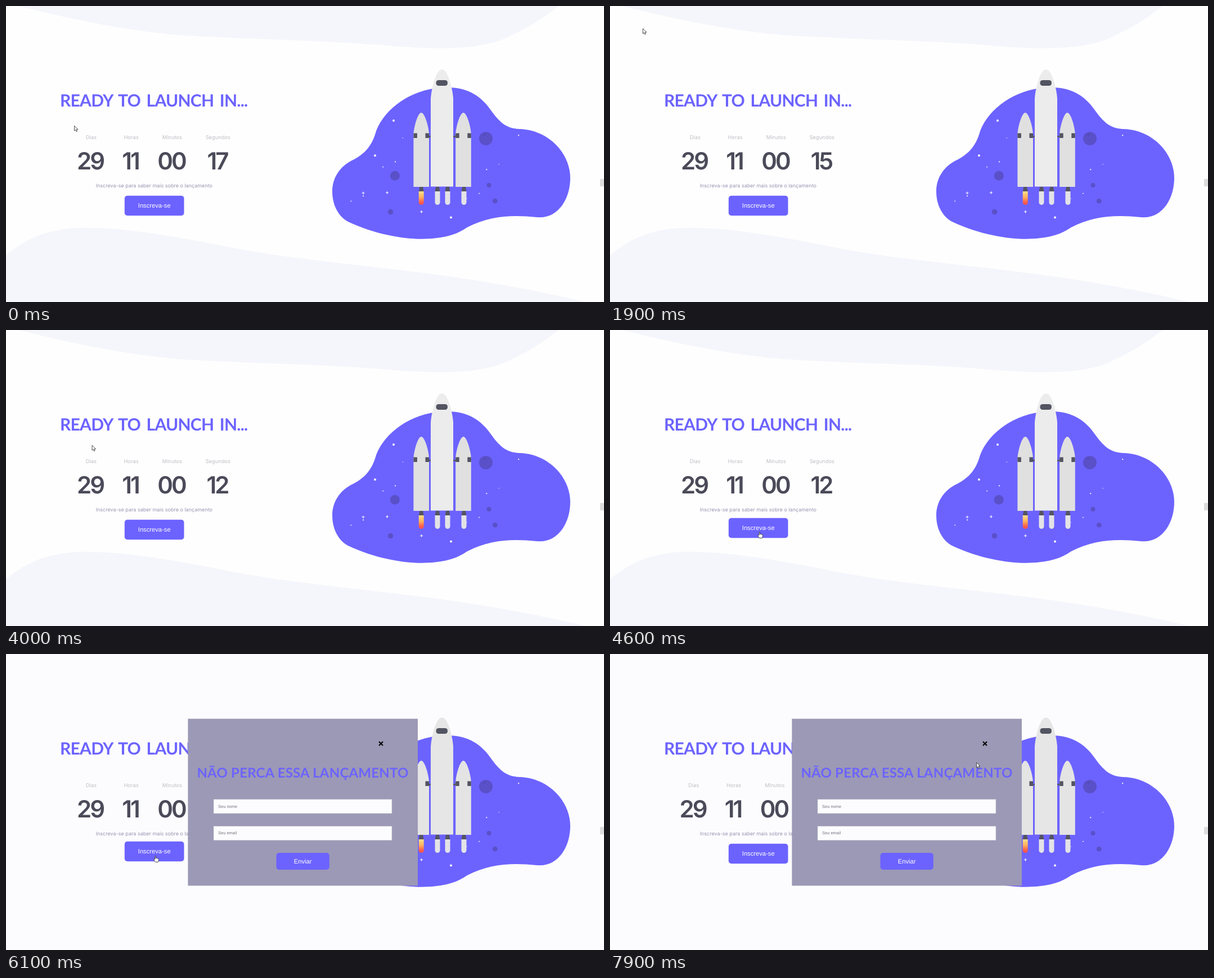
These frames come from a looping animation (1063x527 px, 8 s). An HTML page:

```html
<!DOCTYPE html>
<html lang="pt">
<head>
<meta charset="utf-8">
<title>Countdown</title>
<style>
  html, body { margin: 0; width: 100%; height: 100%; overflow: hidden; background: #fefefe; }
  svg { display: block; width: 1063px; height: 527px; }
  text { font-family: Inter, sans-serif; text-rendering: geometricPrecision; }
  .mid { text-anchor: middle; }
  .title { font-family: Lato, sans-serif; font-weight: 700; fill: #6c63ff; }
  .label { font-size: 9.3px; fill: #bfbfc6; }
  .digits { font-size: 42px; font-weight: 600; letter-spacing: -3px; fill: #4b4a59; }
  .ui { font: 11.2px "Liberation Sans", Arial, sans-serif; fill: #fff; }
  .hint { font: 7.5px "Liberation Sans", Arial, sans-serif; fill: #757580; }
  .dark { fill: #535461; }
</style>
</head>
<body>
<svg viewBox="0 0 1063 527">
  <defs>
    <linearGradient id="fire" x2="0" y2="1">
      <stop offset="0" stop-color="#fbe08c"/>
      <stop offset=".45" stop-color="#fdb05a"/>
      <stop offset=".8" stop-color="#fb5f4c"/>
      <stop offset="1" stop-color="#fa5050"/>
    </linearGradient>
    <g id="booster">
      <path d="M-13.8 322V228C-13 214-6 190 0 190S13 214 13.8 228V322Z"/>
      <path class="dark" d="M-13.8 226.5h6.5v8.5h-6.5ZM7.3 226.5h6.5v8.5h-6.5Z"/>
    </g>
    <path id="blob" d="M580 330C580 303 597 283 617 274C640 262 650 247 656 229C668 185 722 144 785 145C823 145 846 162 863 187C880 211 893 218 912 219C965 220 1003 263 1003 306C1003 344 981 380 943 376C903 372 862 372 820 394C812 399 807 402 800 405C765 418 720 417 680 408C655 403 632 395 607 383.5C591 374 580 355 580 330Z"/>
    <clipPath id="sky"><use href="#blob"/></clipPath>
  </defs>

  <rect id="page" width="1063" height="527"/>
  <g id="waves" fill="#f5f6fb">
    <path d="M22 0C100 20 210 44 310 52C440 60 560 61 660 69C760 78 830 79 882 60C915 45 945 30 982 0Z"/>
    <path d="M0 444C40 410 80 397 130 395C200 393 300 409 400 430C500 449 600 458 700 470C820 484 940 505 1030 527H0Z"/>
  </g>
  <rect x="1056" y="308" width="7" height="13" fill="#dcdcdc"/>

  <use href="#blob" fill="#6c63ff"/>
  <g fill="#5a50c8">
    <circle cx="853" cy="236" r="12"/>
    <circle cx="691.3" cy="302.3" r="8.5"/>
    <circle cx="683.5" cy="366.5" r="4.8"/>
    <circle cx="858.5" cy="319" r="4"/>
    <circle cx="869.3" cy="347.2" r="4.4"/>
  </g>
  <path d="M848 231q2-3 5-2" fill="none" stroke="#4d449f"/>
  <g id="stars" fill="#fff" clip-path="url(#sky)"></g>
  <path d="M689 204h0M656 266.3h0M791 376.5h0" stroke="#fff" stroke-width="4" stroke-linecap="round"/>
  <path d="M632.5 333h5M635 330.5v5M675 332.3h5M677.5 329.8v5M736 366.3h5M738.5 363.8v5" stroke="#fff"/>

  <path class="dark" d="M750 231h6v2.5h-6ZM794 231h6v2.5h-6Z"/>
  <g id="boosters">
    <use href="#booster" x="738.2"/>
    <use href="#booster" x="813"/>
  </g>
  <path id="hull" d="M755 321.5V165C756 148 764 113 775 113S794 148 795 165V321.5Z"/>
  <rect class="dark" x="764.5" y="132" width="20.5" height="10" rx="4.5"/>
  <g id="engines"></g>

  <text class="title" x="96" y="178.5" font-size="30" letter-spacing="-.75" word-spacing="4">READY TO LAUNCH IN...</text>
  <g id="counter">
    <text class="label mid" x="151.3" y="237">Dias</text>
    <text class="label mid" x="222.5" y="237">Horas</text>
    <text class="label mid" x="295.3" y="237">Minutos</text>
    <text class="label mid" x="376.8" y="237">Segundos</text>
    <text class="digits mid" x="149.5" y="291.3">29</text>
    <text class="digits mid" x="221" y="291.3">11</text>
    <text class="digits mid" x="294" y="291.3">00</text>
    <text class="digits mid" x="375.5" y="291.3" id="seconds">17</text>
  </g>
  <text class="mid" x="263.3" y="323.2" font-size="9" fill="#9795b2">Inscreva-se para saber mais sobre o lançamento</text>
  <g id="button">
    <rect x="210.8" y="337.8" width="105.7" height="35.4" rx="5" fill="#6c63ff"/>
    <text class="ui mid" x="263.7" y="359.2">Inscreva-se</text>
  </g>

  <g id="modal">
    <rect x="323.4" y="115.3" width="408.6" height="297.2" fill="#9c99b6"/>
    <path d="M663 156l7 7m0-7l-7 7" stroke="#000" stroke-width="2"/>
    <text class="title mid" x="527.5" y="220" font-size="24" letter-spacing=".2">NÃO PERCA ESSA LANÇAMENTO</text>
    <path d="M369 258.7h317v25.2h-317ZM369 306.5h317v25.2h-317Z" fill="#fcfcfe" stroke="#b4b2c6" stroke-width=".6"/>
    <text class="hint" x="377" y="273.6">Seu nome</text>
    <text class="hint" x="377" y="321.4">Seu email</text>
    <rect x="480.5" y="354" width="94.3" height="30" rx="5" fill="#6c63ff"/>
    <text class="ui mid" x="527.7" y="372.8">Enviar</text>
  </g>

  <g id="cursor" fill="#fff" stroke="#222" stroke-width=".8" stroke-linejoin="round">
    <path id="arrow" d="M.5 .2V9.2L2.6 7.4L4 10.6L5.6 9.9L4.2 6.8H7Z"/>
    <path id="hand" d="M3 7V1.3Q3.8 .2 4.6 1.3V5Q5.6 4.3 6.2 5.3Q7.2 4.6 7.8 5.7Q9.2 5.2 9.4 6.6V9L8.3 12H3.8L.5 7.6Q.6 6.2 1.8 6.6Z"/>
  </g>
</svg>
<script>
const el = id => document.getElementById(id);
const show = (id, on) => el(id).style.display = on ? "" : "none";

// Faint stars, spread evenly by irrational steps
el("stars").innerHTML = Array.from({ length: 16 }, (_, i) =>
  `<circle cx="${600 + i * .618 % 1 * 390}" cy="${160 + i * .755 % 1 * 230}" r="${.7 + i % 3 * .2}"/>`).join("");
el("engines").innerHTML = [738.2, 767, 785, 814].map((x, i) => `
  <path class="dark" d="M${x - 3} 322h6l1.3 8h-8.6Z"/>
  <path d="M${x - 4.5} 330h9v19.5a4.5 4.5 0 0 1-9 0Z" fill="${i ? "#e3e3e6" : "url(#fire)"}"/>`).join("");

const LOOP = 8000, STEP = 100;
const glides = [
  { start: 100, time: 500, to: [58, 40] },
  { start: 2000, time: 700, to: [104, 132] },
  { start: 3000, time: 600, to: [119, 158] },
  { start: 3950, time: 400, to: [262, 358.5] },
  { start: 6600, time: 400, to: [499, 396] },
  { start: 7100, time: 500, to: [580, 370] },
  { start: 7600, time: 300, to: [651, 193] }
];

const easeOut = (t, start, time, power = 2) =>
  1 - (1 - Math.min(1, Math.max(0, (t - start) / time))) ** power;

const pointerAt = t => glides.reduce((at, { start, time, to }) => {
  const k = easeOut(t, start, time);
  return at.map((v, i) => v + (to[i] - v) * k);
}, [121, 213]);

function draw() {
  const t = Math.floor(performance.now() % LOOP / STEP) * STEP;
  const open = t >= 6100;
  const seconds = 17 - Math.floor((t - 101) / 959 + 1);

  el("seconds").textContent = String(seconds).padStart(2, "0");
  el("counter").setAttribute("transform", `translate(${seconds > 9 ? 0 : -2.5} 0)`);
  const lift = 4 * (easeOut(t, 4350, 600, 2.6) - easeOut(t, 6900, 600, 2.6));
  el("button").setAttribute("transform", `translate(0 ${-lift})`);

  show("modal", open);
  show("waves", !open);
  el("page").setAttribute("fill", open ? "#fcfcfe" : "#fefefe");
  el("hull").setAttribute("fill", open ? "#e6e6e6" : "#ececec");
  el("boosters").setAttribute("fill", open ? "#e4e4e4" : "#e0e0e0");

  // The pointer is hidden while it rests over selectable text and fields
  const hand = t >= 4300 && t < 6800;
  show("hand", hand);
  show("arrow", !hand);
  show("cursor", !(t >= 3600 && t < 4000 || t >= 7500 && t < 7800));
  el("cursor").setAttribute("transform", `translate(${pointerAt(t)})`);
  requestAnimationFrame(draw);
}
draw();
</script>
</body>
</html>
```
